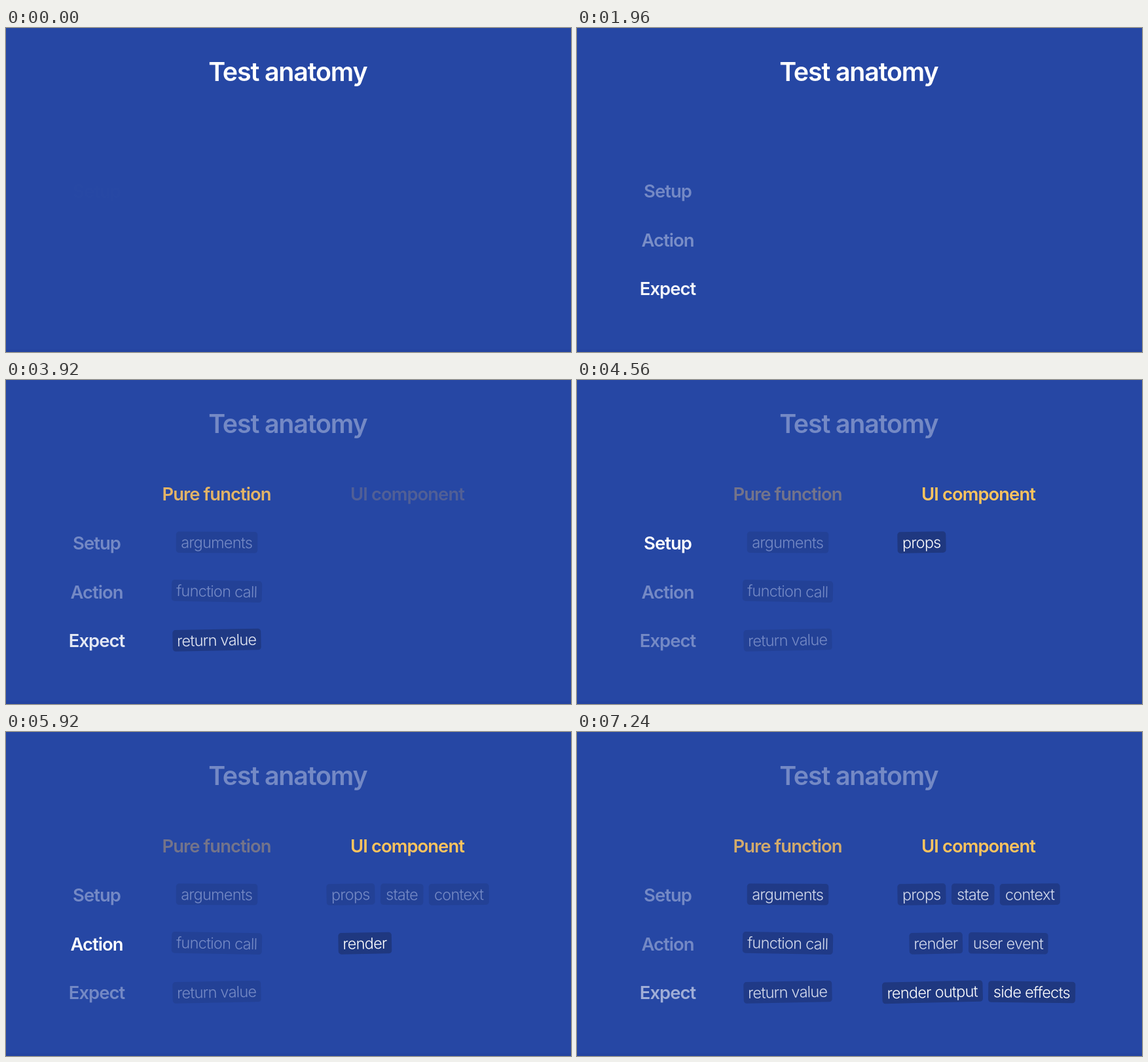
Animation of 863 by 495 pixels, one loop 7280 ms. Source, as an HTML page:

```html
<!DOCTYPE html>
<html lang="en">
<head>
<meta charset="utf-8">
<title>Test anatomy</title>
<style>
  html, body { margin: 0; width: 100%; height: 100%; overflow: hidden; background: #2647a4; }
  svg { display: block; width: 863px; height: 495px; }
  text { font-family: Inter, "Liberation Sans", sans-serif; text-anchor: middle; fill: #fff; }
  .title { font-size: 39.4px; font-weight: 600; letter-spacing: -0.03em; }
  .label { font-size: 27.4px; font-weight: 560; letter-spacing: -0.034em; }
  .column { fill: #ffc45e; }
  .chip text { font-size: 23.6px; font-weight: 340; letter-spacing: -0.034em; }
  .chip rect { fill: #1f3880; }
</style>
</head>
<body>
<svg id="stage" viewBox="0 0 863 495">
  <rect width="863" height="495" fill="#2647a4"/>
  <rect y="491" width="863" height="4" fill="#2444a0"/>
</svg>
<script>
const LOOP = 7280, FADE = 320, DIM = 0.36;
const stage = document.getElementById('stage');

// Start of each build step, in ms
const at = {
  setup: -10, action: 830, expect: 1680, pure: 2150,
  args: 2570, call: 2990, ret: 3410, ui: 3830,
  props: 4250, state: 4670, context: 5090,
  render: 5510, event: 5930, output: 6350, effects: 6770, all: 7040
};

function add(parent, tag, attrs, content) {
  const node = document.createElementNS('http://www.w3.org/2000/svg', tag);
  for (const name in attrs) node.setAttribute(name, attrs[name]);
  if (content) node.textContent = content;
  return parent.appendChild(node);
}

const items = [];

// Each track is a list of [start, opacity] changes
function label(content, className, x, y, start, track) {
  items.push({ node: add(stage, 'text', { x, y, class: className }, content), start, track });
}

function chip(content, x, y, width, tilt, start, end) {
  const node = add(stage, 'g', { class: 'chip' });
  add(node, 'rect', { x: -width / 2, y: -16.3, width, height: 32.6, rx: 4.5 });
  add(node, 'text', { x: -0.3, y: 8.7 }, content);
  items.push({ node, x, y, tilt, start: 0, track: [[start, 1], [end, DIM], [at.all, 1]] });
}

label('Test anatomy', 'title', 430.3, 81.3, 1, [[at.pure, DIM]]);
label('Setup', 'label', 138.5, 258.8, 0,
  [[at.setup, 1], [at.action, DIM], [at.args, 1], [at.call, DIM], [at.props, 1], [at.render, DIM]]);
label('Action', 'label', 138.5, 333.5, 0,
  [[at.action, 1], [at.expect, DIM], [at.call, 1], [at.ret, DIM], [at.render, 1], [at.output, DIM]]);
label('Expect', 'label', 138.5, 408.2, 0,
  [[at.expect, 1], [at.pure, DIM], [at.ret, 1], [at.ui, DIM], [at.output, 1], [at.all, DIM]]);
label('Pure function', 'label column', 321.5, 184, 0, [[at.pure, 1], [at.ui, DIM], [at.all, 1]]);
label('UI component', 'label column', 613, 184, 0, [[at.ui, 1]]);

chip('arguments', 322, 248, 124.5, 0.3, at.args, at.call);
chip('function call', 322, 322.5, 138, 1, at.call, at.ret);
chip('return value', 322, 397.2, 135, -1.1, at.ret, at.ui);
chip('props', 526.5, 248, 74, -1, at.props, at.state);
chip('state', 604.8, 248, 65.5, 0.5, at.state, at.context);
chip('context', 691.8, 248, 92, -0.5, at.context, at.render);
chip('render', 548.3, 322.7, 81.5, -1, at.render, at.event);
chip('user event', 658.8, 322.7, 121.5, 0.5, at.event, at.output);
chip('render output', 543, 397.2, 153.5, -1.3, at.output, LOOP);
chip('side effects', 694.7, 397.2, 133, 0.7, at.effects, LOOP);

function progress(t, start) {
  const p = Math.min(1, Math.max(0, (t - start) / FADE));
  return p * p * (3 - 2 * p);
}

function draw(t) {
  for (const { node, x, y, tilt, start, track } of items) {
    let opacity = start;
    for (const [time, level] of track) opacity += (level - opacity) * progress(t, time);
    node.setAttribute('opacity', opacity.toFixed(3));
    if (tilt) {
      const angle = tilt * progress(t, track[0][0]);
      node.setAttribute('transform', `translate(${x} ${y}) rotate(${angle.toFixed(3)})`);
    }
  }
}

const origin = performance.now();
function tick() {
  draw((performance.now() - origin) % LOOP);
  requestAnimationFrame(tick);
}
draw(0);
requestAnimationFrame(tick);
</script>
</body>
</html>
```
